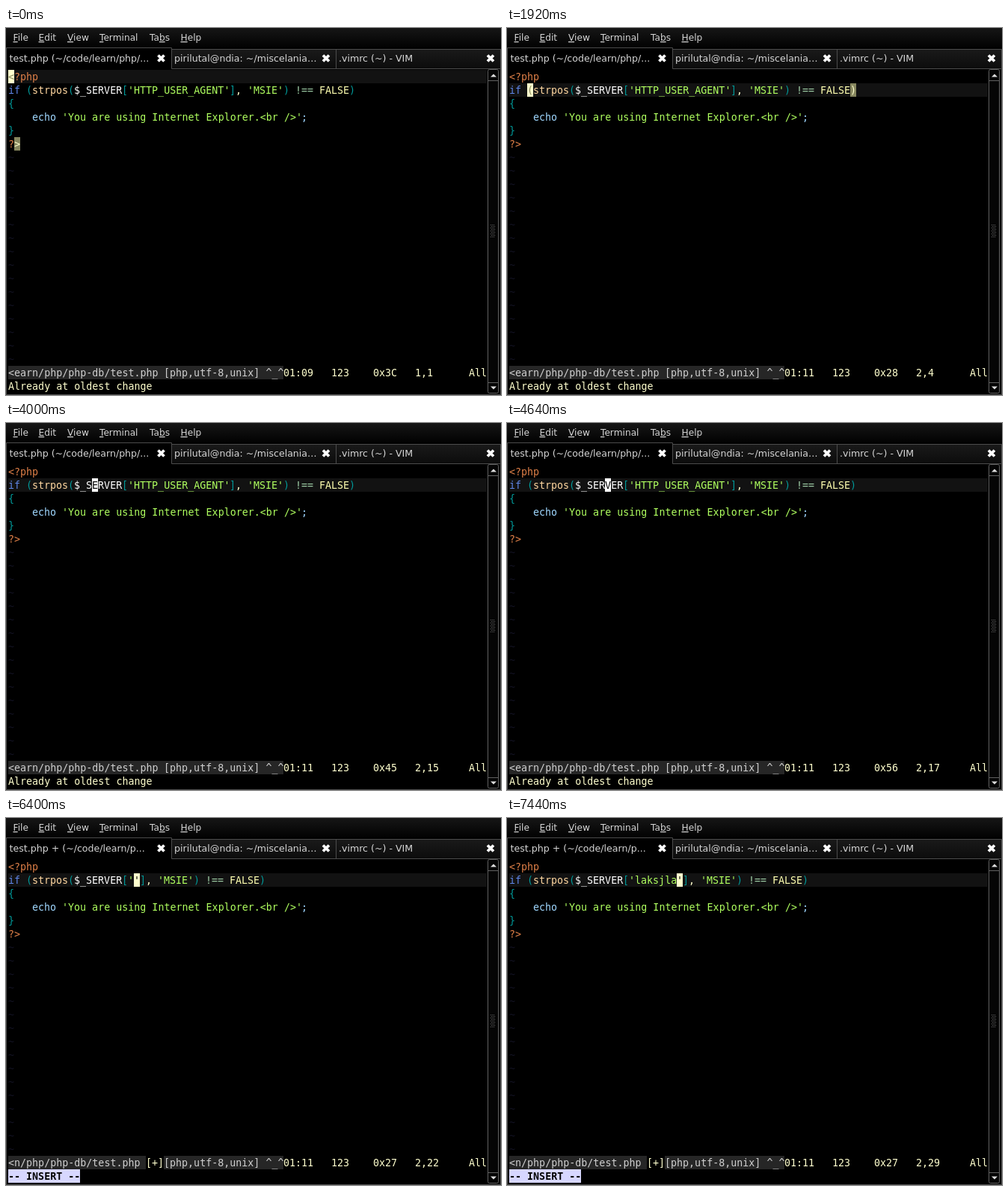
Recreate the animation shown at these times as an HTML page. Size 662 px wide and 491 px high, loop 8 s.

```html
<!DOCTYPE html>
<html lang="en">
<head>
<meta charset="utf-8">
<title>Terminal session</title>
<style>
html, body { margin: 0; width: 100%; height: 100%; overflow: hidden; background: #000; }
svg { display: block; width: 662px; height: 491px; }
text { white-space: pre; }
.ui { font: 12.2px "DejaVu Sans", sans-serif; fill: #d6d6d6; }
.tab { font-size: 12.6px; }
.term { font: 13.333px "DejaVu Sans Mono", monospace; }
</style>
</head>
<body>
<svg viewBox="0 0 662 491">
  <defs>
    <linearGradient id="bar" x2="0" y2="1">
      <stop stop-color="#161616"/><stop offset="1" stop-color="#020202"/>
    </linearGradient>
    <linearGradient id="idle" x2="0" y2="1">
      <stop stop-color="#1a1a1a"/><stop offset="1" stop-color="#0c0c0c"/>
    </linearGradient>
  </defs>
  <rect width="662" height="491"/>
  <rect width="662" height="26" fill="url(#bar)"/>
  <rect x="221" y="28" width="441" height="26" fill="url(#idle)"/>
  <path d="M.5 490.5V26.5H221.5V54.5H661.5V490.5H.5M221.5 28.5H661.5V54.5M441.5 28.5V54.5" fill="none" stroke="#4c4c4c"/>
  <g id="ui" class="ui"></g>
  <g fill="none" stroke="#606060">
    <rect x="644.5" y="55.5" width="14" height="433" rx="2" fill="#050505"/>
    <path d="M645 70.5h13M645 474.5h13"/>
  </g>
  <path d="M648 65.5l4-4 4 4zM648 479.500l4 4 4-4z" fill="#ddd"/>
  <g id="grip" fill="#606060"></g>
  <g id="term" class="term"></g>
</svg>
<script>
const NS = 'http://www.w3.org/2000/svg';
const CREAM = '#ffffcd', ORANGE = '#e08048', BLUE = '#5f87e8', TEAL = '#009898',
  PEACH = '#ffd7a0', GREEN = '#afff5f', SKY = '#9fd7ff', WHITE = '#fff',
  GREY = '#d0d0d0', OLIVE = '#87875f', LILAC = '#d7d7ff';
const ui = document.getElementById('ui'), term = document.getElementById('term'),
  grip = document.getElementById('grip');

function add(parent, tag, attrs, text) {
  const el = document.createElementNS(NS, tag);
  for (const k in attrs) el.setAttribute(k, attrs[k]);
  if (text !== undefined) el.textContent = text;
  return parent.appendChild(el);
}

// Window chrome
function menu(x, label, key) {
  const el = add(ui, 'text', { x, y: 17 }, label.slice(0, key));
  add(el, 'tspan', { 'text-decoration': 'underline' }, label[key]);
  add(el, 'tspan', {}, label.slice(key + 1));
}
function tab(x, label) {
  add(ui, 'path', { d: `M${x + 199} 36.500l8 8m0-8l-8 8`, stroke: '#fff', 'stroke-width': 3.8 });
  return add(ui, 'text', { x, y: 45, class: 'tab' }, label);
}
menu(9.500, 'File', 0);
menu(43.500, 'Edit', 0);
menu(82, 'View', 0);
menu(125, 'Terminal', 0);
menu(192, 'Tabs', 2);
menu(233.500, 'Help', 0);
const title = tab(4.500, '');
tab(225, 'pirilutal@ndia: ~/miscelania…');
tab(445, '.vimrc (~) - VIM');
for (let i = 0; i < 27; i++)
  add(grip, 'rect', { x: 648 + i % 3 * 2 + (i / 3 | 0) % 2, y: 263 + (i / 3 | 0) * 2, width: 1, height: 1 });

// Character grid: 8 by 18 pixel cells, rows and columns counted from 1
const cx = col => 3 + (col - 1) * 8, cy = row => 56 + (row - 1) * 18;
function fill(row, col, n, color) {
  add(term, 'rect', { x: cx(col), y: cy(row), width: n * 8, height: 18, fill: color });
}
function put(row, col, text, color, bold) {
  add(term, 'text', { x: cx(col), y: cy(row) + 14, fill: color, 'font-weight': bold ? 700 : 400 }, text);
}
function putAll(row, col, tokens) {
  for (const [text, color] of tokens) {
    put(row, col, text, color);
    col += text.length;
  }
}

const condition = key => [
  ['if ', BLUE], ['(', TEAL], ['strpos', PEACH], ['(', TEAL], ['$_SERVER', WHITE],
  ['[', TEAL], [key, GREEN], [']', TEAL], [', ', CREAM], ["'MSIE'", GREEN],
  [')', TEAL], [' !== ', '#a0d0a8'], ['FALSE', '#ffffaf'], [')', TEAL]
];

const step = (at, row, col, more) => ({
  at, row, col, clock: '01:11', key: "'HTTP_USER_AGENT'", color: WHITE, ...more
});
const edit = (at, word, more) =>
  step(at, 2, 22 + word.length, { key: `'${word}'`, insert: true, color: CREAM, ...more });

const steps = [
  step(0, 1, 1, { clock: '01:09', color: CREAM, match: [6, 2] }),
  step(160, 1, 1, { clock: '01:10', color: CREAM, match: [6, 2] }),
  step(1040, 2, 1, { clock: '01:10', color: BLUE }),
  step(1920, 2, 4, { color: CREAM, match: [2, 58] }),
  step(2320, 2, 5, { color: PEACH }),
  step(2480, 2, 11, { color: CREAM, match: [2, 47] }),
  step(2800, 2, 13),
  step(3920, 2, 14),
  step(4000, 2, 15),
  step(4240, 2, 16),
  step(4560, 2, 17),
  step(5040, 2, 20, { color: CREAM, match: [2, 38] }),
  step(5520, 2, 22, { color: GREEN }),
  edit(5680, ''),
  edit(6960, 'la'),
  edit(7040, 'laks', { popup: true }),
  edit(7120, 'laks', { popup: true, key: "'laksj", ruler: '2,29-26', hex: '0x27', pending: 'j' }),
  edit(7360, 'laksjl'),
  edit(7440, 'laksjla')
];

function draw(s) {
  term.textContent = '';
  title.textContent = s.insert ? 'test.php + (~/code/learn/p...' : 'test.php (~/code/learn/php/...';
  const cond = condition(s.key);
  const lines = ['<?php', cond.map(t => t[0]).join(''), '', '', '', '?>'];

  fill(s.row, 1, 80, '#121212');
  put(1, 1, '<?php', ORANGE);
  putAll(2, 1, cond);
  put(3, 1, '{', TEAL);
  putAll(4, 5, [['echo ', SKY], ["'You are using Internet Explorer.<br />'", GREEN], [';', SKY]]);
  put(5, 1, '}', TEAL);
  put(6, 1, '?>', ORANGE);
  for (let r = 7; r < 23; r++) put(r, 1, '~', '#121222');

  if (s.match) {
    const [r, c] = s.match;
    fill(r, c, 1, OLIVE);
    put(r, c, lines[r - 1][c - 1], CREAM);
  }
  const ch = lines[s.row - 1][s.col - 1];
  fill(s.row, s.col, 1, s.color);
  put(s.row, s.col, ch, s.match ? OLIVE : '#000');

  if (s.popup) {
    fill(3, 21, 16, '#d7d787');
    put(3, 22, 'Velanor', '#000');
    fill(4, 21, 16, '#444');
    put(4, 22, "Velanor's", CREAM);
  }

  // Status line
  fill(23, 1, 46, '#262626');
  if (s.insert) {
    fill(23, 24, 3, '#000');
    put(23, 1, '<n/php/php-db/test.php', GREY);
    put(23, 24, '[+]', CREAM);
  } else {
    put(23, 1, '<earn/php/php-db/test.php', GREY);
  }
  put(23, 27, '[php,utf-8,unix] ^_^', GREY);
  put(23, 47, s.clock, CREAM);
  put(23, 55, '123', CREAM);
  put(23, 62, s.hex || '0x' + ch.charCodeAt(0).toString(16).toUpperCase(), CREAM);
  put(23, 69, s.ruler || `${s.row},${s.col}`, CREAM);
  put(23, 78, 'All', CREAM);

  // Message line
  if (s.popup) {
    fill(24, 1, 29, LILAC);
    put(24, 1, '-- Keyword completion (^N^P)', '#000', true);
    put(24, 30, 'match 1 of 2', '#00ff00', true);
  } else if (s.insert) {
    fill(24, 1, 12, LILAC);
    put(24, 1, '-- INSERT --', '#000', true);
  } else {
    put(24, 1, 'Already at oldest change', CREAM);
  }
  if (s.pending) put(24, 70, s.pending, CREAM);
}

const LOOP = 8000, start = performance.now();
let shown;
function frame() {
  const t = Math.max(0, performance.now() - start) % LOOP;
  const now = steps.filter(s => s.at <= t).pop();
  if (now !== shown) draw(shown = now);
  requestAnimationFrame(frame);
}
frame();
</script>
</body>
</html>
```
